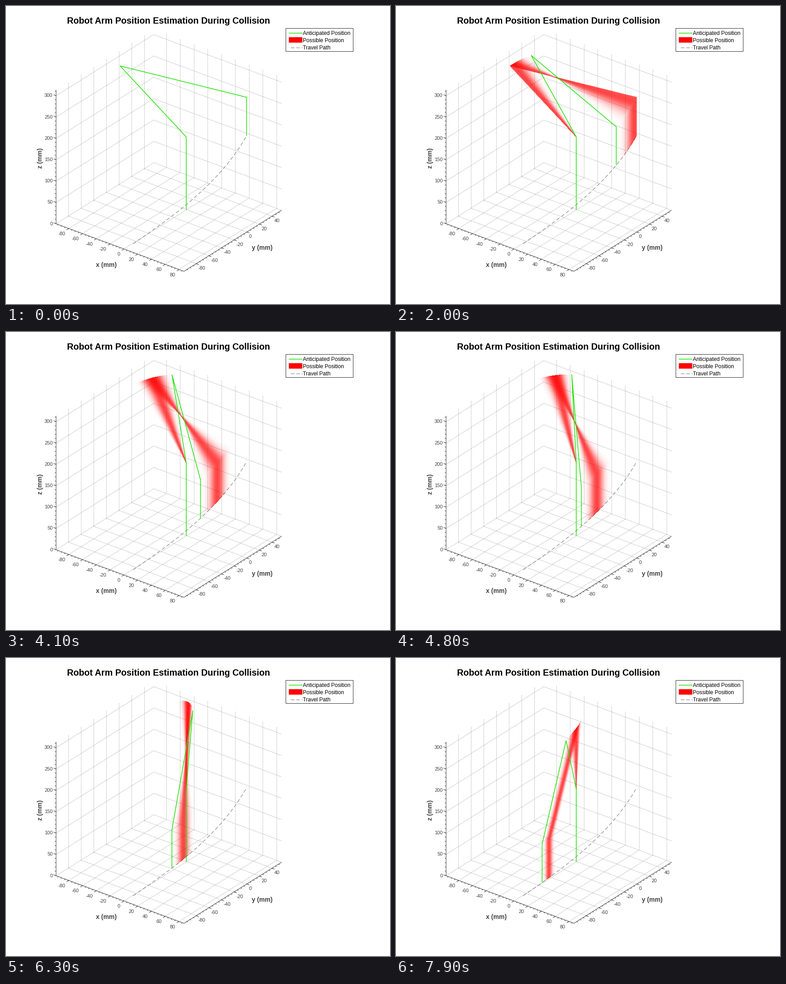
These frames come from a looping animation (850 px wide and 659 px high, 8 s). A matplotlib script:

```python
import numpy as np
import matplotlib.pyplot as plt
from matplotlib.animation import FuncAnimation

W, H, DPI = 850, 659, 100
FRAMES, INTERVAL = 80, 100
PT = 72 / DPI
GREEN, RED, INK = '#1be400', (1, 0, 0), '#404040'

X0, X1, Y0, Y1, Z1 = -98.4, 87.2, -99.3, 55, 313.6
XT, YT, ZT = np.arange(-80, 81, 20), np.arange(-80, 41, 20), np.arange(0, 301, 50)

plt.rcParams['font.family'] = 'Liberation Sans'
fig = plt.figure(figsize=(W / DPI, H / DPI), dpi=DPI, facecolor='white')
ax = fig.add_axes([0, 0, 1, 1])
ax.axis('off')


def project(x, y, z):
    """Orthographic view of a point in mm, in stage pixels."""
    dx, dy = x - X0, y - Y0
    return np.array([110.4 + 1.525 * dx + 1.4 * dy,
                     481 + 0.5666 * dx - 0.875 * dy - 0.944 * z])


def line(points, color=INK, lw=1, **kw):
    xs, ys = zip(*points)
    return ax.plot(xs, ys, color=color, lw=lw * PT, solid_capstyle='butt',
                   dash_capstyle='butt', **kw)[0]


def label(x, y, s, size, ha='center', color=INK, **kw):
    ax.text(x, y + 0.32 * size, s, size=size * PT, ha=ha, va='baseline',
            color=color, **kw)


def grid(*pts):
    line([project(*p) for p in pts], '#707070', 1, ls=(0, (1, 2)), zorder=1)


def ticks(axis_point, major, minor, direction):
    d = np.array(direction)
    for values, size in ((major, 6), (minor, 3)):
        for v in values:
            p = axis_point(v)
            line([p, p + size * d], zorder=2)


def draw_box():
    for x in XT:
        grid((x, Y0, 0), (x, Y1, 0))
        grid((x, Y1, 0), (x, Y1, Z1))
    for y in YT:
        grid((X0, y, 0), (X1, y, 0))
        grid((X0, y, 0), (X0, y, Z1))
    for z in ZT:
        grid((X0, Y0, z), (X0, Y1, z))
        grid((X0, Y1, z), (X1, Y1, z))

    line([project(X0, Y0, Z1), project(X0, Y0, 0), project(X1, Y0, 0),
          project(X1, Y1, 0)], zorder=2)
    ticks(lambda v: project(v, Y0, 0), XT, np.arange(-95, 86, 5), (-0.85, 0.53))
    ticks(lambda v: project(X1, v, 0), YT, np.arange(-95, 55, 5), (0.94, 0.35))
    ticks(lambda v: project(X0, Y0, v), ZT, np.arange(0, 311, 10), (-0.94, -0.35))

    for x in XT:
        px, py = project(x, Y0, 0)
        label(px - 8, py + 11.5, str(x), 11, 'right')
    for y in YT:
        px, py = project(X1, y, 0)
        label(px + 5, py + 10, str(y), 11, 'left')
    for z in ZT:
        px, py = project(X0, Y0, z)
        label(px - 7.5, py - 0.5, str(z), 11, 'right')

    label(221.5, 572, 'x (mm)', 14, weight='bold')
    label(567, 534, 'y (mm)', 14, weight='bold')
    ax.text(76, 335.5, 'z (mm)', size=14 * PT, weight='bold', color=INK,
            rotation=90, ha='center', va='center')
    label(359, 32, 'Robot Arm Position Estimation During Collision', 19.8,
          color='black', weight='bold')


def draw_legend():
    ax.add_patch(plt.Rectangle((619, 48), 149, 51, fc='white', ec='#303030',
                               lw=PT, zorder=5))
    line([(626, 59), (656, 59)], GREEN, 1.5, zorder=6)
    ax.add_patch(plt.Rectangle((625.5, 68.5), 30, 12, fc=RED, ec='none', zorder=6))
    line([(630, 91), (656, 91)], '#707070', ls=(0, (8, 4)), zorder=6)
    for y, s in ((60, 'Anticipated Position'), (75.5, 'Possible Position'),
                 (91.5, 'Travel Path')):
        label(657, y, s, 12, 'left', 'black', zorder=6)


BASE, SHOULDER = np.array([398.5, 450]), np.array([398.5, 289])
HAND = 85

# Elbow positions on screen at a few times (in frames).
EX_T = np.array([0, 10, 20, 29, 41, 55, 63, 71, 79])
EX = np.array([252, 274, 299, 327, 367, 405, 413, 405.5, 376])
EY_T = np.array([0, 9, 20, 29, 36, 41, 45, 55, 63, 71, 79])
EY = np.array([132, 120.5, 109, 100, 95.6, 94, 93.6, 99, 116, 145, 182])


def hermite(t, k, v):
    """Smooth curve through the values v at knots k."""
    m = np.gradient(v, k)
    i = np.clip(np.searchsorted(k, t, side='right') - 1, 0, len(k) - 2)
    h = k[i + 1] - k[i]
    s = (t - k[i]) / h
    return ((1 + 2 * s) * (1 - s) ** 2 * v[i] + s * (1 - s) ** 2 * h * m[i]
            + s * s * (3 - 2 * s) * v[i + 1] + s * s * (s - 1) * h * m[i + 1])


def elbow(t):
    return np.stack([hermite(t, EX_T, EX), hermite(t, EY_T, EY)], -1)


def tip(t):
    return np.stack([532 - t * (1.9237 + 0.01875 * t - 0.0001216 * t * t),
                     286.3 + 3.471 * t - 0.0103 * t * t], -1)


def wrist(t):
    return tip(t) - [0, HAND]


COLLISION, PEAK = 19, 0.73
ALONG = np.linspace(0, 1, 420)[None, :, None]


def sweep(a, b, weight, layer):
    """Paint the segments a-b into layer; the heaviest, drawn last, win."""
    p = np.rint(a[:, None] * (1 - ALONG) + b[:, None] * ALONG).astype(int)
    w = np.broadcast_to(weight[:, None], p.shape[:2])
    layer[p[..., 1].ravel(), p[..., 0].ravel()] = w.ravel()


def haze(t):
    """Opacity of the possible arm positions, lagging behind the plan."""
    lag = 21.5 - 0.2 * t
    mean, sigma = t - lag, 0.3 * lag
    tau = np.arange(max(0, mean - 3 * sigma), min(t, mean + 3 * sigma), 0.1)
    weight = PEAK * np.exp(-0.5 * ((tau - mean) / sigma) ** 2)
    order = np.argsort(weight)
    tau, weight = tau[order], weight[order]
    upper, fore, hand = np.zeros((3, H, W))
    e, w = elbow(tau), wrist(tau)
    sweep(np.broadcast_to(SHOULDER, e.shape), e, weight, upper)
    sweep(e, w, weight, fore)
    sweep(w, tip(tau), weight, hand)
    return 1 - (1 - upper) * (1 - np.maximum(fore, hand))


rgba = np.zeros((H, W, 4))
rgba[..., :3] = RED
cloud = ax.imshow(rgba, interpolation='nearest', aspect='auto', zorder=3)
ax.set_xlim(-0.5, W - 0.5)
ax.set_ylim(H - 0.5, -0.5)
draw_box()
draw_legend()
line(tip(np.linspace(1, 98, 120)), '#707070', ls=(0, (8, 5)), zorder=2)
arm = line([BASE, SHOULDER], GREEN, 1.5, zorder=4)


def update(t):
    arm.set_data(*np.array([BASE, SHOULDER, elbow(t), wrist(t), tip(t)]).T)
    rgba[..., 3] = haze(t) if t >= COLLISION else 0
    cloud.set_data(rgba)
    return arm, cloud


anim = FuncAnimation(fig, update, frames=FRAMES, interval=INTERVAL, repeat=True)
plt.show()
```
